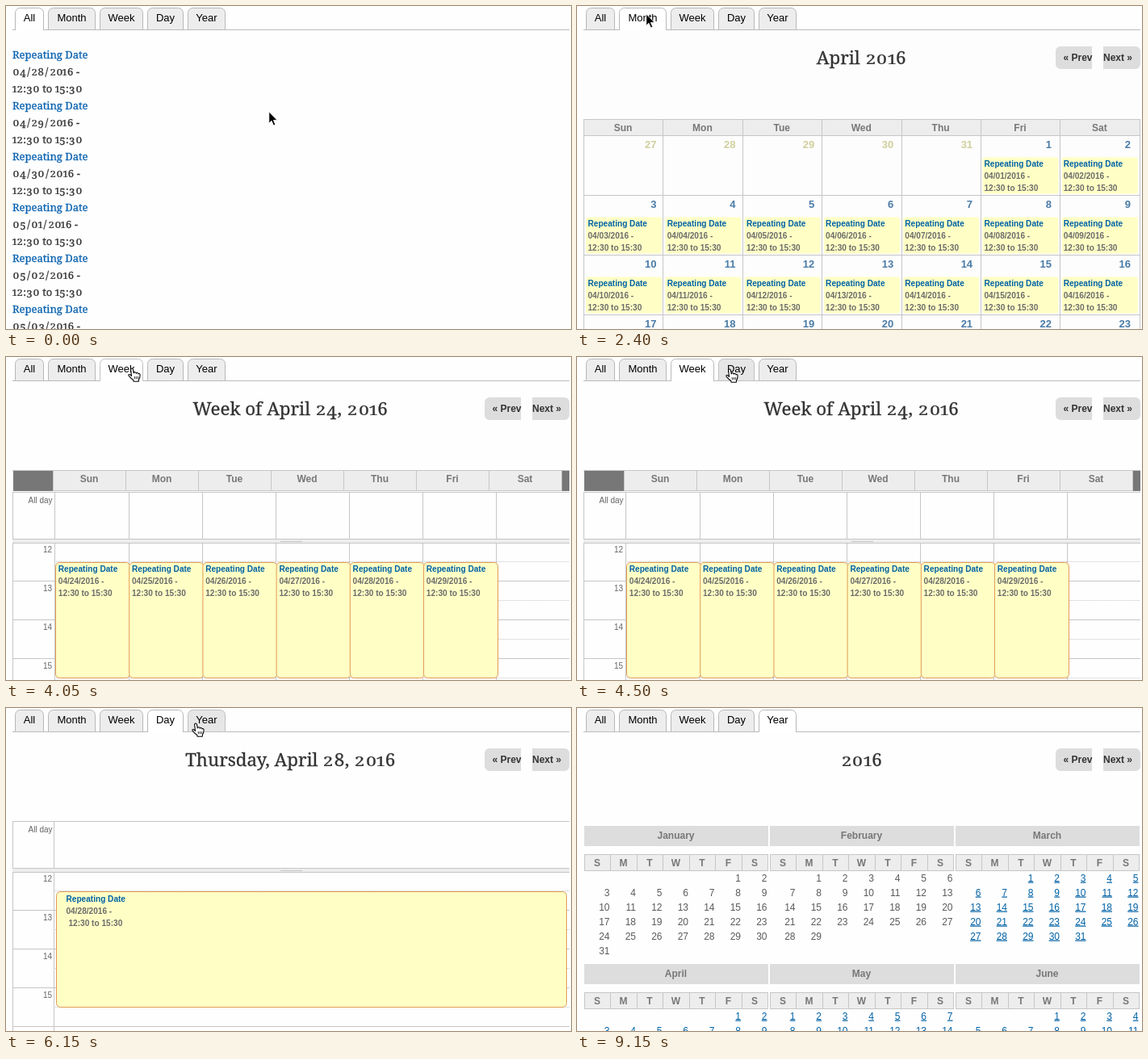
Recreate the animation shown at these times as an HTML page. Size 700x400 px, loop 9450 ms.

```html
<!DOCTYPE html>
<html lang="en">
<head>
<meta charset="utf-8">
<title>Calendar views</title>
<style>
html, body { margin: 0; width: 100%; height: 100%; overflow: hidden; background: #fefefe; }
svg { display: block; width: 700px; height: 400px; font: 12px "Liberation Sans", Arial, sans-serif; }
.page, .cursor { display: none; }
.page.on, .cursor.on { display: inline; }
.line { fill: none; stroke: #c6c6c6; shape-rendering: crispEdges; }
.dotted { stroke-dasharray: 1 1; }
.bold { font-weight: bold; }
.head { font-weight: bold; fill: #777; }
.num { fill: #5a5a5a; }
.small { font-size: 10px; fill: #666; }
.detail { font-size: 10.1px; font-weight: bold; fill: #6b6b6b; }
.link { fill: #0062a5; }
.under { text-decoration: underline; }
.event { fill: #ffffc5; }
.outlined { stroke: #e29a54; }

.bar { stroke: #bbb; }
.tab path { fill: #ededed; stroke: #b8b8b8; }
.tab text { font-size: 13px; }
.tab.hover path { fill: #e6e6e6; stroke: #c0c0c0; }
.tab.on path { fill: #fff; }
.tab .bar { stroke: #bbb; }
.tab.on .bar { display: none; }

.serif {
  font-family: "Noto Serif", Georgia, serif; line-height: 30px; white-space: pre;
  color: #333; -webkit-text-stroke: .3px; font-variant-numeric: lining-nums;
}
.serif.link { color: #0b63b0; }
.serif i { display: inline-block; font-style: normal; padding: 0 .03em; }
.serif .low { transform: scaleY(.76); transform-origin: 50% calc(50% + .388em); }
.serif .zero { padding: 0 .06em; }
.serif .one { padding: 0; margin: 0 -.08em; }
.serif .deep { position: relative; top: .19em; }
.serif .slash { padding: 0 .1em; }
</style>
</head>
<body>
<svg id="stage" viewBox="0 0 700 400"></svg>
<script>
const LOOP = 9450;
const stage = document.getElementById('stage');
const range = (n, make) => Array.from({ length: n }, (_, i) => make(i)).join('');

const rect = (x, y, w, h, fill) => `<rect x="${x}" y="${y}" width="${w}" height="${h}" fill="${fill}"/>`;
const hLine = (x1, x2, y, cls = '') => `<path class="line ${cls}" d="M${x1} ${y + .5}H${x2}"/>`;
const vLine = (x, y1, y2) => `<path class="line" d="M${Math.round(x) + .5} ${y1}V${y2}"/>`;
const label = (x, y, text, cls = '', anchor = 'start') =>
  `<text x="${x}" y="${y}" class="${cls}" text-anchor="${anchor}">${text}</text>`;

// Old-style figures: 0-2 sit at x-height, 3 4 5 7 9 hang below the baseline.
const FIGURES = { '/': 'slash', 0: 'low zero', 1: 'low one', 2: 'low', 6: '', 8: '' };
const figures = text => text.replace(/[\d/]/g, c => `<i class="${FIGURES[c] ?? 'deep'}">${c}</i>`);
const serif = (x, baseline, width, size, text, cls = '', align = 'left') =>
  `<foreignObject x="${x}" y="${baseline - 15 - .388 * size}" width="${width}" height="30">
    <div class="serif ${cls}" style="font-size:${size}px;text-align:${align}">${figures(text)}</div>
  </foreignObject>`;

const pad = n => String(n).padStart(2, '0');
const dateText = (month, day) => `${pad(month)}/${pad(day)}/2016 -`;
const HOURS = '12:30 to 15:30';
const DAYS = ['Sun', 'Mon', 'Tue', 'Wed', 'Thu', 'Fri', 'Sat'];

const heading = text =>
  serif(152.5, 73, 400, 22.3, text, '', 'center') +
  '<path fill="#ddd" d="M638 50v28h-39a6 6 0 0 1-6-6v-16a6 6 0 0 1 6-6zM652 50v28h40a6 6 0 0 0 6-6v-16a6 6 0 0 0-6-6z"/>' +
  `<g fill="#333">${label(602.5, 68, '« Prev', 'bold')}${label(652, 68, 'Next »', 'bold')}</g>`;

const eventText = (x, y, month, day, indent = 0) =>
  label(x, y, 'Repeating Date', 'detail link') +
  label(x, y + 15, dateText(month, day), 'detail') +
  label(x + indent, y + 30, HOURS, 'detail');

const eventBox = (x, y, w, h, cls, r) =>
  `<rect class="event ${cls}" x="${x}" y="${y}" width="${w}" height="${h}" rx="${r}"/>`;

function listPage() {
  return range(6, i => {
    const y = 65 + 63 * i;
    const day = new Date(2016, 3, 28 + i);
    return serif(8, y, 200, 13, 'Repeating Date', 'link') +
      serif(8, y + 21, 200, 13, dateText(day.getMonth() + 1, day.getDate())) +
      serif(8, y + 42, 200, 13, HOURS);
  });
}

function monthPage() {
  const cell = (row, col) => {
    const day = new Date(2016, 2, 27 + row * 7 + col);
    const inMonth = day.getMonth() === 3;
    const y = 160 + 74 * row;
    const number = `<g font-size="13" fill="${inMonth ? '#4a7ba6' : '#cfcf9c'}">` +
      label(98.5 + 97.9 * col, y + 15.5, day.getDate(), 'bold', 'end') + '</g>';
    if (!inMonth) return number;
    return number + eventBox(11 + 98.3 * col, y + 27.5, 94, 45, '', 3) +
      eventText(13.5 + 98.2 * col, y + 38.5, 4, day.getDate());
  };
  return rect(8, 30, 690, 370, '#fdfdfd') + heading('April 2016') +
    rect(8, 140, 690, 20, '#ededed') +
    hLine(8, 698, 140) + range(4, r => hLine(8, 698, 160 + 74 * r)) +
    range(8, c => vLine(8 + 98.4 * c, 140, 400)) +
    DAYS.map((d, c) => label(57 + 98.4 * c, 155, d, 'head', 'middle')).join('') +
    range(4, r => range(7, c => cell(r, c)));
}

// Hour grid shared by the week and day views.
function hourGrid(top, axis) {
  return vLine(8, top, 400) + vLine(axis, top, 400) + hLine(8, 698, top) +
    label(57.5, top + 14, 'All day', 'small', 'end') +
    range(4, i => {
      const y = top + 62 + 48 * i;
      return label(57, y + 13, 12 + i, 'small', 'end') +
        hLine(axis, 698, y + 24, 'dotted') + hLine(8, 698, y + 48);
    });
}
const splitter = top => rect(8, top + 58, 690, 5, '#ededed') +
  hLine(8, 698, top + 58) + hLine(8, 698, top + 63) + hLine(340, 367, top + 61);

function weekPage() {
  const left = i => 61.5 + 91.2 * i;
  return heading('Week of April 24, 2016') +
    rect(58, 140, 631, 26, '#ededed') + rect(9, 141, 49, 25, '#777') + rect(689, 141, 9, 25, '#777') +
    hLine(8, 698, 140) + hLine(58, 689, 165) +
    range(8, i => vLine(58 + 90 * i, 140, 166)) +
    DAYS.map((d, i) => label(103 + 90 * i, 155, d, 'head', 'middle')).join('') +
    hourGrid(167, 60) + range(6, i => vLine(152 + 91 * i, 167, 400)) + splitter(167) +
    range(6, i => eventBox(left(i), 254.5, 92, 143, 'outlined', 5) + eventText(left(i) + 3.3, 266, 4, 24 + i));
}

function dayPage() {
  return heading('Thursday, April 28, 2016') + hourGrid(140, 59) + splitter(140) +
    eventBox(62.5, 227.5, 632, 143, 'outlined', 5) + eventText(74.5, 239.5, 4, 28, 3);
}

function yearPage() {
  const month = m => {
    const x = 9 + 230 * (m % 3), y = 146 + 171 * Math.floor(m / 3);
    const first = new Date(2016, m, 1);
    const name = first.toLocaleString('en', { month: 'long' });
    const count = new Date(2016, m + 1, 0).getDate();
    return rect(x, y, 228, 25, '#ddd') + label(x + 113.5, y + 16, name, 'head', 'middle') +
      rect(x, y + 35, 228, 21, '#ededed') + hLine(x, x + 228, y + 35) + hLine(x, x + 228, y + 55) +
      range(8, i => vLine(x + 32.43 * i, y + 35, y + 56)) +
      DAYS.map((d, i) => label(x + 16 + 32.5 * i, y + 50, d[0], 'head', 'middle')).join('') +
      range(count, i => {
        const slot = first.getDay() + i;
        return label(x + 31.5 + 32.5 * (slot % 7), y + 68.5 + 18 * Math.floor(slot / 7),
          i + 1, m > 1 ? 'link under' : 'num', 'end');
      });
  };
  return heading('2016') + range(6, month);
}

const TABS = [['All', 11, 36], ['Month', 52, 59], ['Week', 116, 54], ['Day', 175, 45], ['Year', 225, 47]];
const tab = ([name, x, w]) => `<g class="tab">
  <path d="M${x + .5} 30V8.5a6 6 0 0 1 6-6h${w - 13}a6 6 0 0 1 6 6V30"/>
  ${hLine(x, x + w, 29, 'bar')}${label(x + w / 2, 19, name, '', 'middle')}</g>`;

const ARROW = `<g id="arrow" class="cursor"><path fill="#000" stroke="#fff" stroke-width=".8" stroke-linejoin="round"
  d="M.8 1V15.2L4 12.2L6.5 18L8.8 17L6.4 11.4H11Z"/></g>`;
const HAND = `<g id="hand" class="cursor"><path fill="#fff" stroke="#000" stroke-width="1.1" stroke-linejoin="round"
  d="M4.5 10.5L3.6 2.6Q3.6 1 5 1Q6.2 1 6.5 2.6L7.3 7Q7.5 5.8 8.7 5.8Q10 5.8 10.2 7.2Q10.6 6.4 11.7 6.5Q12.7 6.7 12.9 8Q13.3 7.4 14.1 7.6Q15.2 8 15.1 9.5Q15 13 13.5 15L13.3 17.2H7L6.8 15.5Q4 13.5 1.2 10.3Q.4 9 1.6 8.5Q2.8 8.2 4.5 10.5Z"/>
  <path fill="none" stroke="#000" stroke-width=".8" d="M8.2 11l.3 3.2M10.3 11l.1 3.2M12.4 11l-.1 3.2"/></g>`;

stage.innerHTML =
  [listPage, monthPage, weekPage, dayPage, yearPage].map(make => `<g class="page">${make()}</g>`).join('') +
  hLine(8, 698, 29, 'bar') + TABS.map(tab).join('') + ARROW + HAND;

const pages = [...stage.querySelectorAll('.page')];
const tabs = [...stage.querySelectorAll('.tab')];
const cursors = [...stage.querySelectorAll('.cursor')];

// start ms, open page, hovered tab, cursor, x, y
const NONE = -1;
const STEPS = [
  [0, 0, NONE, 'arrow', 325, 130],
  [600, 0, NONE, 'arrow', 231, 102],
  [750, 0, NONE, 'arrow', 112, 41],
  [900, 0, 1, 'hand', 84, 12],
  [1050, 0, 1, 'hand', 81, 10],
  [2250, 0, 1, 'arrow', 85, 9],
  [2400, 1, NONE, 'arrow', 85, 9],
  [2550, 1, 1, 'hand', 90, 10],
  [2700, 1, 2, 'hand', 125, 11],
  [2850, 1, 2, 'hand', 129, 12],
  [3000, 1, 2, 'hand', 133, 12],
  [3150, 1, 2, 'hand', 133, 13],
  [4050, 2, 2, 'hand', 151, 13],
  [4200, 2, 2, 'hand', 163, 13],
  [4350, 2, 3, 'hand', 180, 13],
  [4500, 2, 3, 'hand', 184, 14],
  [5250, 3, NONE, 'hand', 184, 14],
  [5550, 3, NONE, 'hand', 185, 14],
  [5700, 3, 3, 'hand', 202, 16],
  [5850, 3, 3, 'hand', 214, 16],
  [6000, 3, 4, 'hand', 225, 18],
  [6150, 3, 4, 'hand', 230, 18],
  [8550, 3, NONE, '', 0, 0],
  [9150, 4, NONE, '', 0, 0]
];

let shown;
function show(step) {
  const [, page, hover, cursor, x, y] = step;
  pages.forEach((el, i) => el.classList.toggle('on', i === page));
  tabs.forEach((el, i) => {
    el.classList.toggle('on', i === page);
    el.classList.toggle('hover', i === hover);
  });
  cursors.forEach(el => {
    el.classList.toggle('on', el.id === cursor);
    el.setAttribute('transform', `translate(${x} ${y})`);
  });
}

const start = performance.now();
function tick() {
  const time = (performance.now() - start) % LOOP;
  const step = STEPS.findLast(s => s[0] <= time) || STEPS[0];
  if (step !== shown) show(shown = step);
  requestAnimationFrame(tick);
}
tick();
</script>
</body>
</html>
```
